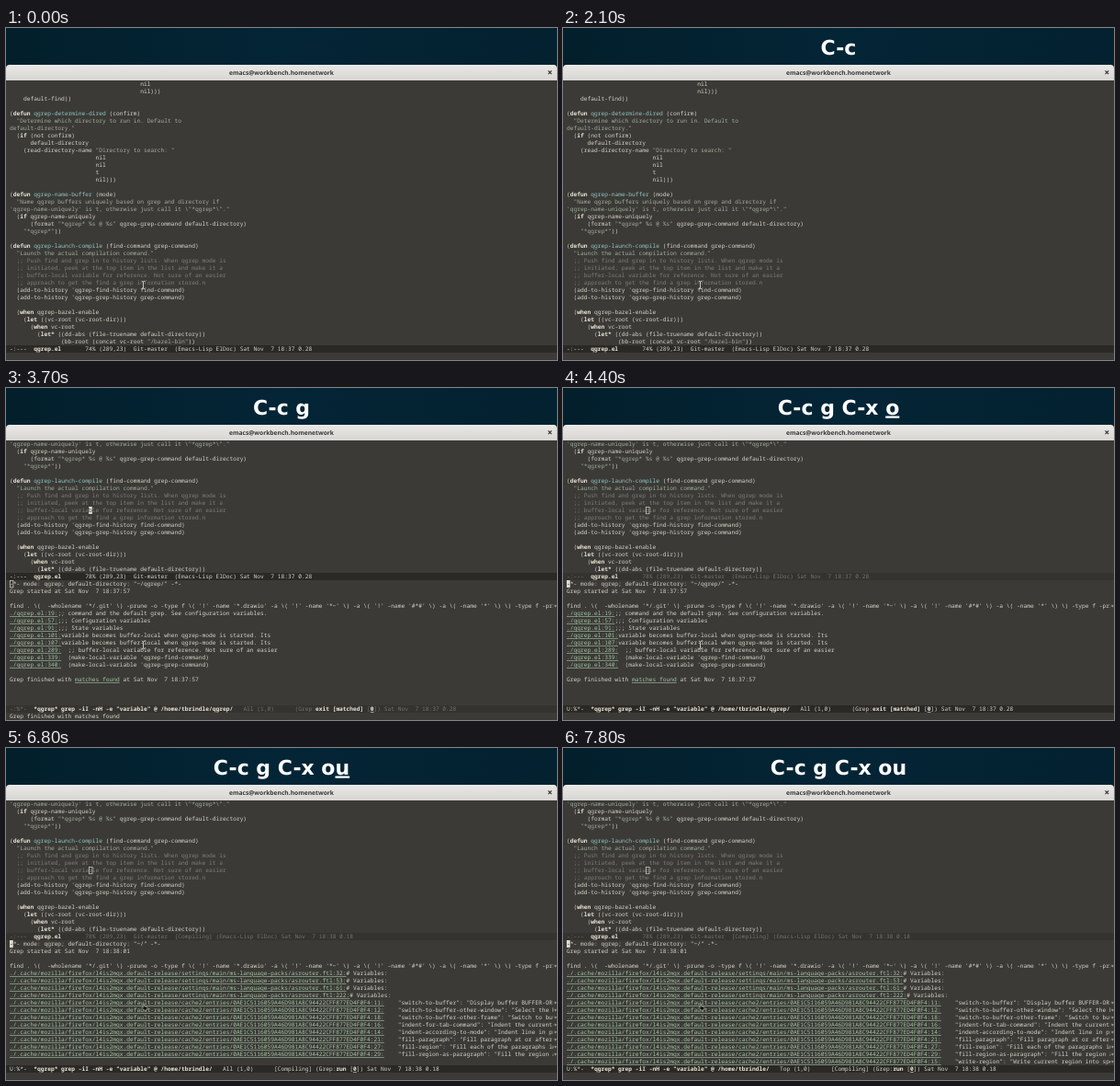
Write an HTML page that moves like this. It is 600 px wide and 361 px high and loops after 8000 ms.

```html
<!DOCTYPE html>
<html lang="en">
<head>
<meta charset="utf-8">
<title>Editor grep session</title>
<style>
html, body { margin: 0; width: 100%; height: 100%; overflow: hidden; background: #03222f; }
svg { display: block; width: 600px; height: 361px; text-rendering: geometricPrecision; }
text { white-space: pre; }
.code { font: 6.24px "Noto Sans Mono", "DejaVu Sans Mono", monospace; fill: #d6d4c6; }
.kw, .bold { font-weight: 700; fill: #e9e6d3; }
.fn { fill: #93c7c2; }
.str { fill: #a0ad98; }
.com { fill: #7f7e74; }
.link { fill: #a5c3a2; text-decoration: underline; }
.dim { fill: #74726a; }
.num { font-weight: 700; fill: #e9e6d3; text-decoration: underline; }
.inv { fill: #3b3a37; }
.keys { font: 700 22px "DejaVu Sans", sans-serif; fill: #fff; text-anchor: middle; }
.recent { text-decoration: underline; text-decoration-skip-ink: none; }
.title { font: 700 6.7px "Open Sans", "Noto Sans", sans-serif; fill: #35383a; text-anchor: middle; }
</style>
</head>
<body>
<svg viewBox="0 0 600 361">
  <defs>
    <linearGradient id="sky">
      <stop offset="0" stop-color="#021f2b"/>
      <stop offset=".5" stop-color="#042536"/>
      <stop offset="1" stop-color="#03212f"/>
    </linearGradient>
    <linearGradient id="bar" x2="0" y2="1">
      <stop offset="0" stop-color="#e9e8e6"/>
      <stop offset="1" stop-color="#d8d6d2"/>
    </linearGradient>
    <clipPath id="pane"><rect y="57" width="596" height="304"/></clipPath>
  </defs>
  <rect width="600" height="361" fill="url(#sky)"/>
  <path d="M0 57V44q0-4 4-4H596q4 0 4 4V57Z" fill="url(#bar)"/>
  <text class="title" x="300" y="51.3">emacs@workbench.homenetwork</text>
  <path d="M590.5 46.5l3.6 3.6m0-3.6l-3.6 3.6" stroke="#35383a" stroke-width="1.1"/>
  <rect y="57" width="600" height="304" fill="#3b3a37"/>
  <g id="editor"></g>
  <g id="pointer"></g>
  <text id="keys" class="keys" x="300" y="28.5"></text>
</svg>
<script>
const LOOP = 8000, CHAR = 3.744, ROW = 8, LEFT = 4, TOP = 57;
const FIRST_SPLIT_LINE = 17, SPLIT_LINES = 18, POINT = { line: 26, col: 23, char: "b" };

const source = String.raw`                                      nil
                                      nil)))
    default-find))

(defun qgrep-determine-dired (confirm)
  "Determine which directory to run in. Default to
default-directory."
  (if (not confirm)
      default-directory
    (read-directory-name "Directory to search: "
                         nil
                         nil
                         t
                         nil)))

(defun qgrep-name-buffer (mode)
  "Name qgrep buffers uniquely based on grep and directory if
'qgrep-name-uniquely' is t, otherwise just call it \"*qgrep*\"."
  (if qgrep-name-uniquely
      (format "*qgrep* %s @ %s" qgrep-grep-command default-directory)
    "*qgrep*"))

(defun qgrep-launch-compile (find-command grep-command)
  "Launch the actual compilation command."
  ;; Push find and grep in to history lists. When qgrep mode is
  ;; initiated, peek at the top item in the list and make it a
  ;; buffer-local variable for reference. Not sure of an easier
  ;; approach to get the find a grep information stored.n
  (add-to-history 'qgrep-find-history find-command)
  (add-to-history 'qgrep-grep-history grep-command)

  (when qgrep-bazel-enable
    (let ((vc-root (vc-root-dir)))
      (when vc-root
        (let* ((dd-abs (file-truename default-directory))
               (bb-root (concat vc-root "/bazel-bin"))`;

const findCommand = String.raw`find . \(  -wholename '*/.git' \) -prune -o -type f \( '!' -name '*.drawio' -a \( '!' -name '*~' \) -a \( '!' -name '#*#' \) -a \( -name '*' \) \) -type f -print`;

const esc = s => s.replace(/&/g, "&amp;").replace(/</g, "&lt;");
// A span never crosses a line break, so highlighted text can be split into lines.
const span = (cls, s) => s.split("\n").map(p => `<tspan class="${cls}">${esc(p)}</tspan>`).join("\n");

function highlight(code) {
  const token = /(;;.*)|("(?:\\.|[^"\\])*")|(?<=\()(defun|if|let\*?|when)(?= )|(?<=\(defun )([\w-]+)/g;
  const classes = ["com", "str", "kw", "fn"];
  let out = "", last = 0;
  for (const m of code.matchAll(token)) {
    const kind = m.slice(1, 5).findIndex(Boolean);
    out += esc(code.slice(last, m.index)) + span(classes[kind], m[0]);
    last = m.index + m[0].length;
  }
  return (out + esc(code.slice(last))).split("\n");
}
const codeLines = highlight(source);

const rowY = row => TOP + row * ROW;
const textRow = (row, markup, cls = "", col = 0) =>
  `<text xml:space="preserve" class="code ${cls}" x="${LEFT + col * CHAR}" y="${rowY(row) + 6.1}">${markup}</text>`;
const textRows = (start, lines) => lines.map((s, i) => s && textRow(start + i, s)).join("");

function cursor(row, col, char, style) {
  if (style === "off") return "";
  const x = LEFT + col * CHAR, y = rowY(row);
  if (style === "hollow")
    return `<rect x="${x + .3}" y="${y + .4}" width="3.6" height="7.4" fill="none" stroke="#d6d4c6" stroke-width=".7"/>`;
  return `<rect x="${x}" y="${y}" width="${CHAR}" height="8" fill="#dedccd"/>` + textRow(row, char, "inv", col);
}

function modeLine(row, active, markup) {
  return `<rect y="${rowY(row)}" width="600" height="8" fill="${active ? "#2a2926" : "#343330"}"/>` +
    textRow(row, markup, active ? "" : "dim");
}

function sourceModeLine(row, s) {
  const compiling = s.second ? "[Compiling] " : "";
  return modeLine(row, s.focus === "source", "-:---  " + span("bold", "qgrep.el") +
    `       ${s.split ? 78 : 74}% (289,23)  Git-master  ${compiling}(Emacs-Lisp ElDoc) Sat Nov  7 ${s.clock}`);
}

function grepModeLine(s) {
  const active = s.focus === "grep";
  const name = `*qgrep* grep -iI -nH -e "variable" @ /home/tbrindle/${s.second ? "" : "qgrep/"}`;
  const status = s.second
    ? "[Compiling] (Grep:" + span("bold", "run")
    : "(Grep:" + span("bold", "exit [matched]");
  return modeLine(36, active, (active ? "U" : "-") + ":%*-  " + span("bold", name) +
    `   ${s.more ? "Top" : "All"} (1,0)      ${status} [${span("num", "0")}]) Sat Nov  7 ${s.clock}`);
}

const link = (path, rest) => span("link", path) + esc(rest);

const header = (dir, time) => [
  `-*- mode: qgrep; default-directory: "${dir}" -*-`, `Grep started at Sat Nov  7 ${time}`, "", esc(findCommand)
];

const firstGrep = [
  ...header("~/qgrep/", "18:37:57"),
  ...[
    [19, ";; command and the default grep. See configuration variables."],
    [57, ";;; Configuration variables"],
    [91, ";;; State variables"],
    [101, "variable becomes buffer-local when qgrep-mode is started. Its"],
    [107, "variable becomes buffer-local when qgrep-mode is started. Its"],
    [289, "  ;; buffer-local variable for reference. Not sure of an easier"],
    [339, "  (make-local-variable 'qgrep-find-command)"],
    [340, "  (make-local-variable 'qgrep-grep-command)"]
  ].map(([n, s]) => link(`./qgrep.el:${n}:`, s)),
  "",
  "Grep finished with " + span("link", "matches found") + " at Sat Nov  7 18:37:57"
];

const profile = "./.cache/mozilla/firefox/l4is2mgx.default-release/";
const secondGrep = [
  ...header("~/", "18:38:01"),
  ...[32, 53, 61, 222].map(n =>
    link(`${profile}settings/main/ms-language-packs/asrouter.ftl:${n}:`, "# Variables:")),
  ...[
    [11, "switch-to-buffer", "Display buffer BUFFER-OR-NAME"],
    [12, "switch-to-buffer-other-window", "Select the buffer"],
    [18, "switch-to-buffer-other-frame", "Switch to buffer"],
    [16, "indent-for-tab-command", "Indent the current line"],
    [14, "indent-according-to-mode", "Indent line in proper way"],
    [21, "fill-paragraph", "Fill paragraph at or after point"],
    [27, "fill-region", "Fill each of the paragraphs in the region"],
    [29, "fill-region-as-paragraph", "Fill the region as one"],
    [15, "write-region", "Write current region into specified file"]
  ].map(([n, name, doc]) => link(
    `${profile}cache2/entries/0AE1C5116059A46D981A8C94422CFF877ED4F0F4:${n}:`, `    "${name}": "${doc}`))
];

const overflowMark = row =>
  `<path d="M596.6 ${rowY(row) + 4}h2.6m-1.2-1.3l1.3 1.3l-1.3 1.3" fill="none" stroke="#d6d4c6" stroke-width=".6"/>`;

function drawEditor(s) {
  const blink = s.cursorOn ? "solid" : "off";
  const clip = body => `<g clip-path="url(#pane)">${body}</g>`;
  if (!s.split)
    return clip(textRows(0, codeLines)) + cursor(POINT.line, POINT.col, POINT.char, blink) + sourceModeLine(36, s);

  const inGrep = s.focus === "grep";
  const results = s.second ? secondGrep.slice(0, s.more ? 13 + 4 : 12 + 4) : firstGrep;
  let out = clip(textRows(0, codeLines.slice(FIRST_SPLIT_LINE, FIRST_SPLIT_LINE + SPLIT_LINES)) + textRows(19, results));
  out += overflowMark(22);
  if (s.second) for (let row = 27; row < 19 + results.length; row++) out += overflowMark(row);
  out += cursor(POINT.line - FIRST_SPLIT_LINE, POINT.col, POINT.char, inGrep ? "hollow" : blink);
  out += cursor(19, 0, "-", inGrep ? blink : "hollow");
  out += sourceModeLine(18, s) + grepModeLine(s);
  if (s.echo) out += textRow(37, "Grep finished with matches found");
  return out;
}

const ibeam = `<path d="M147.8 275.2q1.5 0 1.7 .9q.2-.9 1.7-.9M149.5 276v7M147.8 283.8q1.5 0 1.7-.9q.2 .9 1.7 .9"
  fill="none" stroke="#e8e6dc" stroke-width=".8"/>`;
const hand = `<path d="M149.3 278.6q.7-.8 1.3 .1v2.1l2.5 .6q.9 .3 .8 1.2l-.5 2.4h-3.2l-2.3-2.7q.2-.9 1.4-.1Z"
  fill="#111" stroke="#e8e6dc" stroke-width=".5"/>`;

const strokes = [[1900, "C-c"], [2400, " g"], [4200, " C-x"], [4400, " o"], [6700, "u"]];
const RECENT = 200;

function drawKeys(t) {
  return strokes.filter(([at]) => t >= at).map(([at, key]) =>
    t < at + RECENT ? key.replace(/\S+/, k => span("recent", k)) : key).join("");
}

const blinks = [400, 1000, 1500, 2000, 2400, 2900, 3400, 3900, 4200, 4900, 5400, 5900, 6400, 7300, 7800];

function stateAt(t) {
  return {
    split: t >= 2400,
    focus: t >= 4400 ? "grep" : "source",
    echo: t >= 2400 && t < 4200,
    clock: t < 4900 ? "18:37 0.28" : "18:38 0.18",
    second: t >= 6800,
    more: t >= 7100,
    cursorOn: blinks.filter(b => t >= b).length % 2 === 1
  };
}

const [editor, pointer, keys] = ["editor", "pointer", "keys"].map(id => document.getElementById(id));
const shown = new Map();
function show(el, markup) {
  if (shown.get(el) === markup) return;
  shown.set(el, markup);
  el.innerHTML = markup;
}

let start;
function frame(now) {
  start ??= now;
  const t = Math.max(0, now - start) % LOOP, s = stateAt(t);
  show(editor, drawEditor(s));
  show(pointer, s.second ? hand : ibeam);
  show(keys, drawKeys(t));
  requestAnimationFrame(frame);
}
requestAnimationFrame(frame);
</script>
</body>
</html>
```
